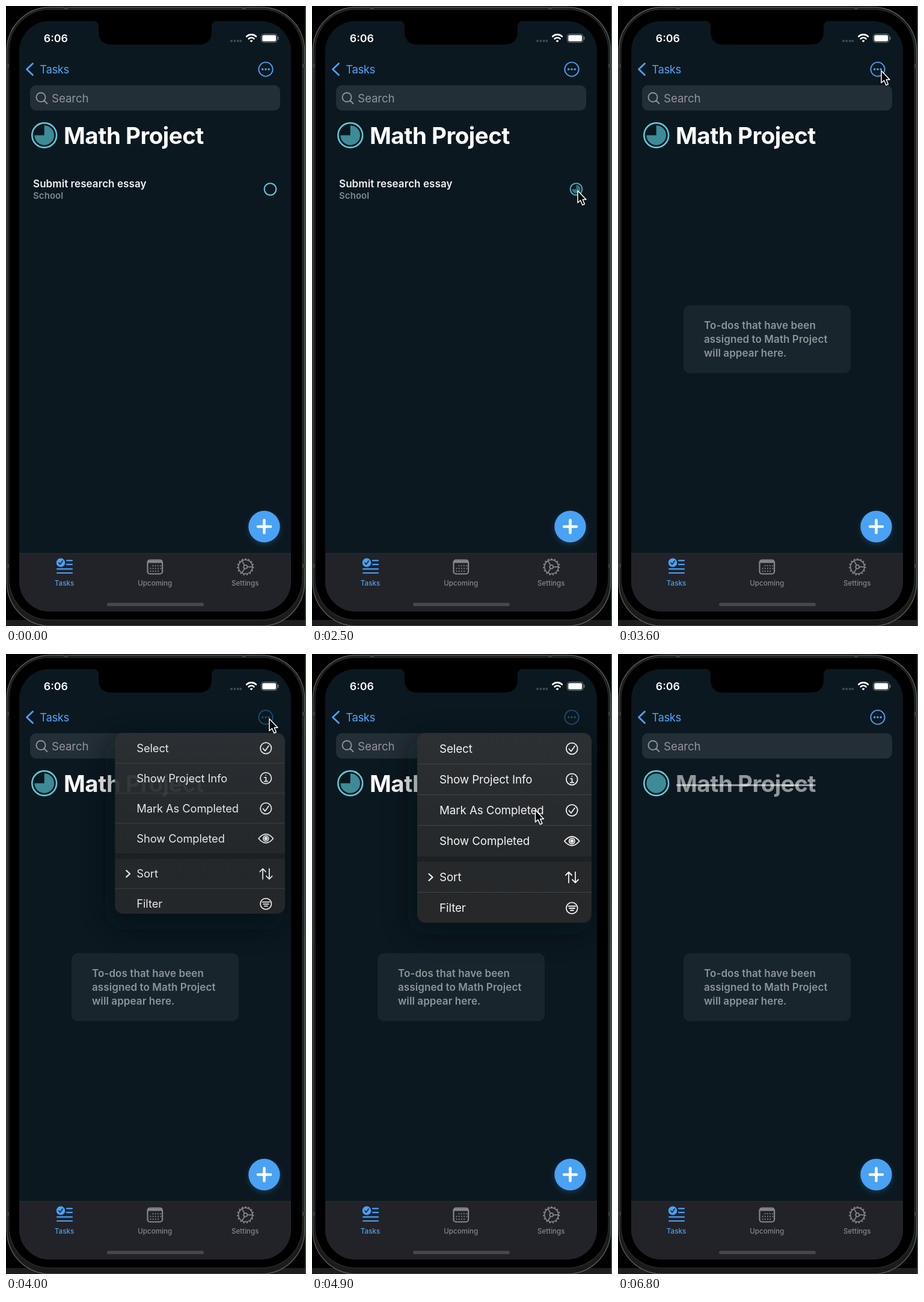
An HTML page for the animation above (7900 ms loop, 499 by 1029 pixels).

```html
<!DOCTYPE html>
<html lang="en">
<head>
<meta charset="utf-8">
<title>Completing a project</title>
<style>
  html, body { margin: 0; width: 100%; height: 100%; overflow: hidden; background: #000; }
  svg { display: block; width: 100%; height: 100%; font-family: Inter, Roboto, sans-serif; }
  .line { fill: none; stroke-linecap: round; stroke-linejoin: round; }
  .blue { stroke: #4aa2f5; }
  .gray { stroke: #84868b; }
  .teal { stroke: #5cc9d8; fill: none; }
  .pie { fill: #3c8b96; }
  .semi { font-weight: 600; }
  .tab { font-size: 11.6px; font-weight: 500; text-anchor: middle; fill: #84868b; }
  .card text { font-size: 17px; letter-spacing: .08px; fill: #8d9498; }
  #menu text { font-size: 18.8px; letter-spacing: -.1px; fill: #f2f3f4; }
  #menu .line { stroke: #eff0f1; stroke-width: 1.8; }
</style>
</head>
<body>
<svg viewBox="0 0 499 1029">
  <defs>
    <linearGradient id="panel" x2="0" y2="1">
      <stop stop-color="#2c3033"/><stop offset=".6" stop-color="#26292b"/><stop offset="1" stop-color="#26282a"/>
    </linearGradient>
    <filter id="blur" x="-40%" y="-40%" width="180%" height="180%"><feGaussianBlur stdDeviation="22"/></filter>
    <filter id="glow" x="-40%" y="-40%" width="180%" height="180%"><feGaussianBlur stdDeviation="5"/></filter>
    <clipPath id="screen"><rect x="22" y="25" width="452" height="980" rx="50"/></clipPath>
    <clipPath id="menuClip"><rect id="menuBox" x="175" y="131" width="290" height="315" rx="14"/></clipPath>
  </defs>

  <!-- device -->
  <rect width="499" height="1029"/>
  <rect y="1019" width="499" height="10" fill="#1e1e1f"/>
  <rect x="1.500" y="2" width="495" height="1027" rx="72" fill="#1b1b1c" stroke="#5b5b5d" stroke-width="1.400"/>
  <rect x="5" y="5.500" width="488" height="1013.500" rx="68" stroke="#343436"/>
  <path d="M0 99h5M0 929h5M493 99h5M493 929h5M100 1v5M396 1v5" stroke="#3b3b3d" stroke-width="6"/>
  <path d="M498.200 0V1029" stroke="#067a10" stroke-width="1.600"/>

  <g clip-path="url(#screen)">
    <rect x="22" y="25" width="452" height="980" fill="#0b1820"/>
    <rect x="22" y="908" width="452" height="100" fill="#212329"/>
    <path d="M22 908.500H474" stroke="#2b2d32"/>
  </g>
  <path d="M144 24Q154 25 154 35V42Q154 64 176 64H320Q342 64 342 42V35Q342 25 352 24Z"/>

  <!-- status bar -->
  <text x="62.800" y="60" class="semi" font-size="17.800" fill="#fff">6:06</text>
  <path d="M375 58h.01M380.300 58h.01M385.600 58h.01M390.300 58h.01" class="line" stroke="#3f4a52" stroke-width="4"/>
  <g class="line" stroke="#fff" stroke-width="2.700">
    <path d="M400.300 50.500a11.500 11.500 0 0 1 15.600 0M403.700 54.300a6.800 6.800 0 0 1 8.800 0"/>
    <path d="M407 57.800h2.200l-1.100 1.200z" stroke-width="2"/>
  </g>
  <rect x="424.500" y="46.500" width="26.500" height="14" rx="4" fill="none" stroke="#737b80"/>
  <rect x="426.200" y="48.200" width="23" height="10.600" rx="2.500" fill="#fff"/>
  <path d="M452.700 51.500v4" class="line" stroke="#737b80" stroke-width="1.500"/>

  <!-- navigation -->
  <path d="M44.500 95.500L34.500 105l10 9.500" class="line blue" stroke-width="2.800"/>
  <text x="56.300" y="112" font-size="18.500" letter-spacing="-.4" fill="#4aa2f5">Tasks</text>
  <g id="more">
    <circle cx="432" cy="105" r="11.600" class="line blue" stroke-width="1.900"/>
    <path d="M426.800 105h.01M432 105h.01M437.200 105h.01" class="line blue" stroke-width="3.600"/>
  </g>
  <rect x="40" y="131.500" width="416" height="42" rx="10" fill="#242e36"/>
  <path d="M65.500 151.500a7.500 7.500 0 1 1-15 0a7.500 7.500 0 0 1 15 0M63.500 157l5 5" class="line" stroke="#8e959b" stroke-width="1.900"/>
  <text x="76" y="159.700" font-size="18.800" letter-spacing="-.15" fill="#8e959b">Search</text>

  <circle cx="63.700" cy="214.500" r="20.400" class="teal" stroke-width="2.600"/>
  <path id="projectPie" class="pie"/>
  <text id="title" x="96" y="228.500" font-size="38.500" font-weight="700" letter-spacing="-.5" fill="#fff">Math Project</text>
  <path id="strike" d="M97 217.800H328.500" stroke="#fff" stroke-width="3"/>

  <!-- to-do row -->
  <g id="row">
    <text x="45" y="301" class="semi" font-size="17" letter-spacing=".07" fill="#f0f2f3">Submit research essay</text>
    <text x="45" y="319.500" class="semi" font-size="14.800" letter-spacing=".2" fill="#81888c">School</text>
    <g id="check">
      <circle cx="439.500" cy="304" r="9.800" class="teal" stroke-width="2"/>
      <path id="rowPie" class="pie"/>
    </g>
  </g>

  <g id="empty" class="card semi">
    <rect x="109" y="496.500" width="278" height="113" rx="11" fill="#18252c"/>
    <text x="143" y="536">To-dos that have been</text>
    <text x="143" y="559">assigned to Math Project</text>
    <text x="143" y="582.300">will appear here.</text>
  </g>

  <!-- add button -->
  <circle cx="429.500" cy="867" r="26" fill="#4aa2f5" opacity=".25" filter="url(#glow)"/>
  <circle cx="429.500" cy="864" r="26.200" fill="#4aa2f5"/>
  <path d="M419 864h21M429.500 853.500v21" class="line" stroke="#fff" stroke-width="4.600"/>

  <!-- tab bar -->
  <circle cx="91" cy="923.800" r="7.300" fill="#4aa2f5"/>
  <path d="M87.800 924l2.400 2.600 4-5.500" class="line" stroke="#212329" stroke-width="1.700"/>
  <path d="M101 920.300h9M101 926.800h9M85 934.300h25M85 941h25" class="line blue" stroke-width="2.200"/>
  <text x="97" y="961.500" class="tab" style="fill:#4aa2f5">Tasks</text>
  <rect x="235.500" y="919.500" width="24.600" height="23" rx="4" class="line gray" stroke-width="2.200"/>
  <path d="M236 922.300h24" class="gray" stroke-width="4"/>
  <path d="M244.500 929h13M240.500 933.500h17M240.500 938h13" class="line gray" stroke-width="2.200" stroke-dasharray=".01 4.200"/>
  <text x="247.700" y="961.500" class="tab">Upcoming</text>
  <g class="gray" fill="none" stroke-width="1.700">
    <circle cx="398.300" cy="930.800" r="11.600"/>
    <circle cx="398.300" cy="930.800" r="13.200" stroke-width="2" stroke-dasharray="2.300 3.229"/>
    <circle cx="398.300" cy="930.800" r="3"/>
    <path d="M401.500 930.800h9M396.700 928l-4.500-7.600M396.700 933.600l-4.500 7.600"/>
  </g>
  <text x="397.800" y="961.500" class="tab">Settings</text>
  <rect x="168" y="990.500" width="161" height="5.600" rx="2.800" fill="#47484b"/>

  <!-- context menu -->
  <g id="menu">
    <rect x="160" y="140" width="305" height="325" rx="30" fill="#03100f" opacity=".5" filter="url(#blur)"/>
    <g clip-path="url(#menuClip)">
      <rect x="175" y="131" width="290" height="315" fill="url(#panel)"/>
      <rect x="175" y="336" width="290" height="9" fill="#1e2123"/>
      <path d="M175 182.500H465M175 233.500H465M175 284.500H465M175 395.500H465" stroke="#414548"/>
      <g id="items"></g>
      <path d="M194.500 365l6 5.500-6 5.500" class="line" style="stroke-width:2.300"/>
      <g class="line">
        <path d="M427.500 157.500l3.500 4 6-8.500M427.500 260l3.500 4 6-8.500"/>
        <path d="M430 206.800h2.500v6.200M429.800 213.300h5.500M432.300 203h.01"/>
        <path d="M419.800 310.500Q432.300 295.500 444.800 310.500Q432.300 325.500 419.800 310.500Z"/>
        <circle cx="432.300" cy="310.500" r="4.600"/>
        <circle cx="432.300" cy="310.500" r="2" fill="#eff0f1"/>
        <path d="M427 379.500V362M422 367l5-5 5 5M438 362v17.500M433 374.500l5 5 5-5"/>
        <path d="M426.500 418.500h12M428 422h9M430 425.500h5"/>
      </g>
    </g>
  </g>

  <path id="cursor" d="M0 0V20L4.500 16 7.900 23.800 11.400 22.300 8.200 14.700H14Z" fill="#000" stroke="#fff" stroke-width="1.500" stroke-linejoin="round"/>
</svg>
<script>
const LOOP = 7900, STEP = 100;
const $ = id => document.getElementById(id);
const show = (id, opacity) => $(id).setAttribute('opacity', opacity);

const MENU = [
  ['Select', 157, true], ['Show Project Info', 208, true], ['Mark As Completed', 259.5, true],
  ['Show Completed', 310.5], ['Sort', 370.5], ['Filter', 421.7, true]
];
$('items').innerHTML = MENU.map(([label, y, ringed]) =>
  `<text x="212" y="${y + 6.7}">${label}</text>` +
  (ringed ? `<circle class="line" cx="432.3" cy="${y}" r="9.4"/>` : '')).join('');

// Linear interpolation through [time, value] steps.
function track(steps, t) {
  const next = steps.findIndex(([time]) => time > t);
  if (next === 0) return steps[0][1];
  if (next < 0) return steps[steps.length - 1][1];
  const [t0, a] = steps[next - 1], [t1, b] = steps[next];
  return a + (b - a) * (t - t0) / (t1 - t0);
}

// Sector running clockwise from twelve o'clock.
function drawPie(id, cx, cy, r, part) {
  const angle = Math.min(part, .9999) * 2 * Math.PI;
  const x = cx + r * Math.sin(angle), y = cy - r * Math.cos(angle);
  $(id).setAttribute('d', part <= 0 ? '' :
    `M${cx} ${cy}V${cy - r}A${r} ${r} 0 ${part > .5 ? 1 : 0} 1 ${x} ${y}Z`);
}

const cursorX = [[100, 482], [800, 449], [1300, 442], [2800, 442], [3000, 444], [3500, 438],
  [4300, 438], [4800, 371.5], [6500, 371.5], [6700, 154]];
const cursorY = [[100, 400], [800, 325], [1300, 306.5], [2800, 306.5], [3400, 112], [3500, 107.5],
  [4300, 107.5], [4800, 259], [6500, 259], [6700, 78]];
const menuScale = [[3650, .1], [3800, .75], [3900, .93], [4000, .976], [4200, 1], [4930, 1], [5150, .12]];
const menuFade = [[3650, 0], [4020, 1], [4930, 1], [5130, 0]];
const moreFade = [[3650, 1], [3900, .38], [5000, .38], [5300, 1]];
const done = [[5000, 0], [5150, 1]];

function render(t) {
  $('cursor').setAttribute('transform', `translate(${track(cursorX, t)} ${track(cursorY, t)})`);
  show('cursor', t >= 100 && t < 6800 ? 1 : 0);

  drawPie('rowPie', 439.5, 304, 7, track([[2000, 0], [2500, .75], [2650, 1]], t));
  show('check', track([[2000, 1], [2500, .8]], t));
  show('row', track([[2700, 1], [3000, 0]], t));
  show('empty', track([[2900, 0], [3300, 1]], t));

  const scale = track(menuScale, t);
  $('menu').setAttribute('transform', `translate(432 131) scale(${scale}) translate(-432 -131)`);
  $('menuBox').setAttribute('height', 315 * scale);
  show('menu', track(menuFade, t));
  show('more', track(moreFade, t));

  const finished = track(done, t);
  drawPie('projectPie', 63.7, 214.5, 16.3, track([[5000, .75], [5300, 1]], t));
  show('title', 1 - .45 * finished);
  show('strike', .6 * finished);
}

function tick() {
  const t = performance.now() % LOOP;
  render(Math.floor(t / STEP) * STEP);
  requestAnimationFrame(tick);
}
tick();
</script>
</body>
</html>
```
